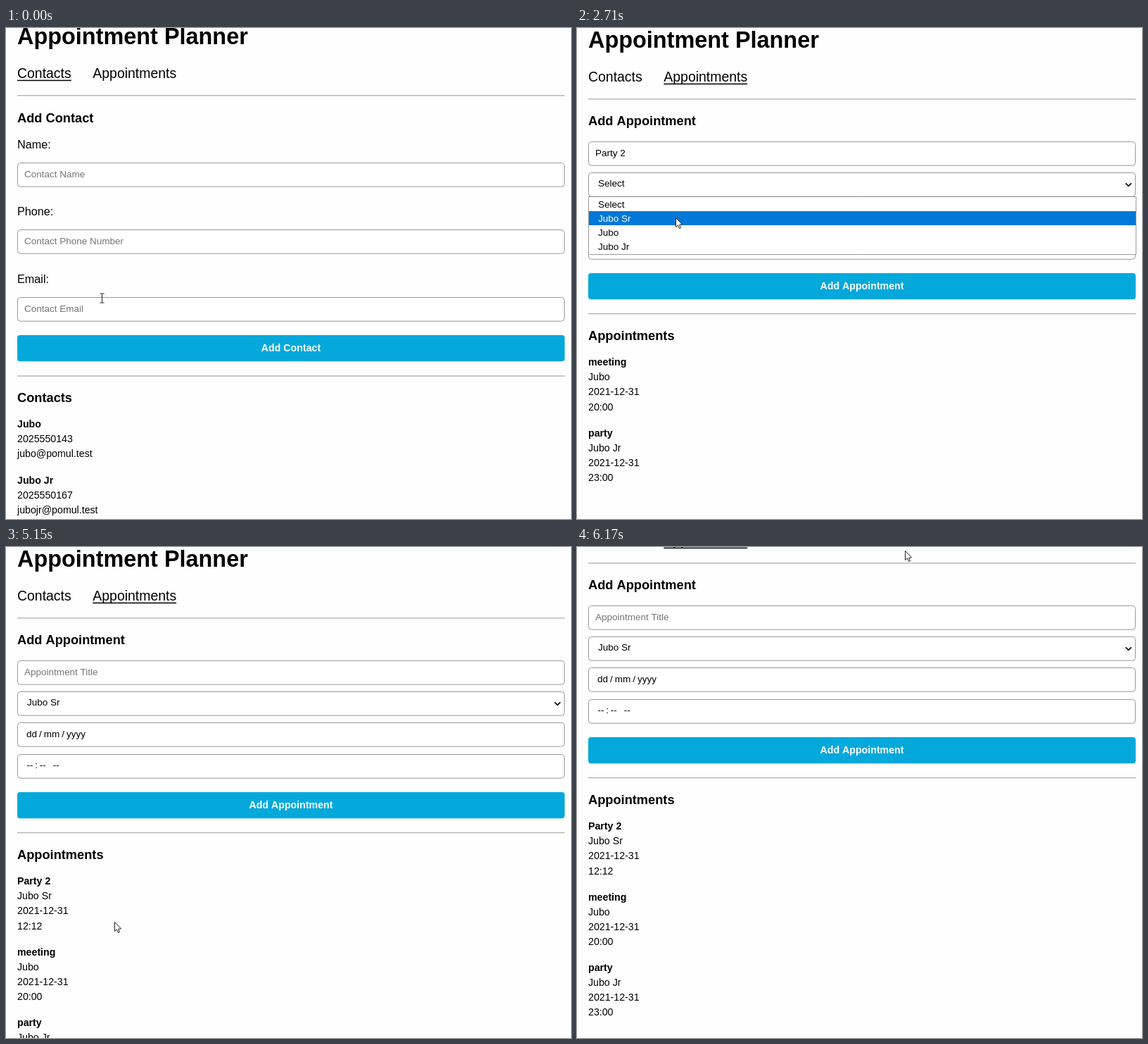
Recreate the animation shown at these times as an HTML page with a canvas. Size 803 by 697 pixels, loop 6200 ms.

```html
<!DOCTYPE html>
<html lang="en">
<head>
<meta charset="utf-8">
<title>Appointment Planner</title>
<style>
html, body { margin: 0; width: 803px; height: 697px; overflow: hidden; background: #fff; }
canvas { display: block; }
</style>
</head>
<body>
<canvas id="stage" width="803" height="697"></canvas>
<script>
const ctx = document.getElementById('stage').getContext('2d');
const LOOP = 6200, STEP = 46.7, GLIDE = 180;
const SANS = '"Liberation Sans", Arial, sans-serif';
const UI = '"Open Sans", "Noto Sans", sans-serif';
const BLUE = '#04a8da', PICK = '#0078d7', GREY = '#757575', EDGE = '#999';

const NAME = 'Jubo', JR = NAME + ' Jr', SR = NAME + ' Sr';
const PHONE = '2025550143', MAIL = '@pomul.test';
const people = [
  [SR, PHONE, 'syk' + MAIL],
  [NAME, PHONE, 'jubo' + MAIL],
  [JR, '2025550167', 'jubojr' + MAIL]
];
const DAY = '2021-12-31';
const events = [
  ['Party 2', SR, DAY, '12:12'],
  ['meeting', NAME, DAY, '20:00'],
  ['party', JR, DAY, '23:00']
];

// Moments of each action
const T = {
  name: 210, addContact: 1170, tab: 2005, title: 2300, openList: 2600,
  pickName: 2780, openDate: 2950, month: 3370, monthStep: 110, pickDate: 4000,
  focusTime: 4240, addEvent: 4760, rest: 5100, scroll: 5230
};
const segment = i => T.focusTime + 70 + i * 95;

// Each action happens at a place; the pointer glides there just before
const actions = [
  { at: T.name, x: 150, y: 208 },
  { at: T.addContact, x: 345, y: 460 },
  { at: T.tab, x: 171, y: 64 },
  { at: T.title, x: 150, y: 178 },
  { at: T.openList, x: 150, y: 222 },
  { at: T.pickName, x: 140, y: 270 },
  { at: T.openDate, x: 101, y: 266 },
  { at: T.month, x: 258, y: 312, repeat: 4 },
  { at: T.pickDate, x: 220, y: 477 },
  { at: T.focusTime, x: 36, y: 311 },
  { at: T.addEvent, x: 400, y: 368 },
  { at: T.rest, x: 154, y: 532, repeat: 0 },
  { at: LOOP, x: 466, y: 5, repeat: 0 }
];

const clamp = v => Math.max(0, Math.min(1, v));
const between = (t, a, b) => t >= a && t < b;
const mix = (a, b, u) => a + (b - a) * u;

function pointer(t) {
  let x = 135, y = 397;
  for (const a of actions) {
    const u = clamp((t - a.at + 60 + GLIDE) / GLIDE), e = u * u * (3 - 2 * u);
    x = mix(x, a.x, e);
    y = mix(y, a.y, e);
  }
  return [x, y];
}

function pressed(t) {
  return actions.some(({ at, repeat = 1 }) => {
    for (let i = 0; i < repeat; i++)
      if (between(t - at - i * T.monthStep, -60, 40)) return true;
    return false;
  });
}

function typed(s, t, start, span) {
  return s.slice(0, Math.floor(s.length * clamp((t - start) / span)));
}

function text(s, x, y, size, color = '#000', weight = '', align = 'left', family = SANS) {
  ctx.font = `${weight} ${size}px ${family}`;
  ctx.fillStyle = color;
  ctx.textAlign = align;
  ctx.fillText(s, x, y);
}

function rect(x, y, w, h, color) {
  ctx.fillStyle = color;
  ctx.fillRect(x, y, w, h);
}

function box(x, y, w, h, r, fill, stroke) {
  ctx.beginPath();
  ctx.roundRect(x, y, w, h, r);
  if (fill) { ctx.fillStyle = fill; ctx.fill(); }
  if (stroke) { ctx.strokeStyle = stroke; ctx.lineWidth = 1; ctx.stroke(); }
}

function line(points, color, width) {
  ctx.beginPath();
  points.forEach(p => ctx.lineTo(...p));
  ctx.strokeStyle = color;
  ctx.lineWidth = width;
  ctx.stroke();
}

// Open arrow head of half-size r; turn 0 points down
function chevron(x, y, r, turn, color, width) {
  ctx.save();
  ctx.translate(x, y);
  ctx.rotate(turn * Math.PI / 2);
  line([[-r, -r / 2], [0, r / 2], [r, -r / 2]], color, width);
  ctx.restore();
}

const rule = y => rect(16, y, 778, 1, EDGE);
const heading = (s, y) => text(s, 16, y, 18.24, '#000', 'bold');
const frame = y => box(16.5, y + .5, 777, 33.7, 4, '#fff', EDGE);

function input(y, value, hint, caret) {
  frame(y);
  text(value || hint, 26, y + 20.5, 13.51, value ? '#000' : GREY);
  if (caret) rect(26 + (value ? ctx.measureText(value).width : 0), y + 8, 1, 16, '#000');
}

function button(s, y) {
  box(16, y, 778, 37.2, 4, BLUE);
  text(s, 405, y + 23.4, 14.19, '#fff', 'bold', 'center');
}

function list(items, y, pitch) {
  items.forEach((rows, i) => rows.forEach((s, j) =>
    text(s, 16, y + i * pitch + j * 21.1, 14.19, '#000', j ? '' : 'bold')));
}

// Segmented date or time value: [text, gap after, selected]
function segments(parts, x, y) {
  for (const [s, gap, on] of parts) {
    ctx.font = `13.51px ${SANS}`;
    const w = ctx.measureText(s).width;
    if (on) rect(x - 3, y - 13, w + 6.5, 17, PICK);
    text(s, x, y, 13.51, on ? '#fff' : '#000');
    x += w + gap;
  }
}

function header(active) {
  text('Appointment Planner', 16, 28.4, 32.43, '#000', 'bold');
  ['Contacts', 'Appointments'].forEach((s, i) => {
    const x = i ? 123.3 : 16;
    text(s, x, 76.4, 19.46);
    if (i === active) rect(x, 78.7, ctx.measureText(s).width, 1.5, '#000');
  });
  rule(100.4);
}

function contactsPage(t) {
  ctx.save();
  ctx.translate(0, -5);
  header(0);
  ctx.restore();
  heading('Add Contact', 133.5);
  const done = t >= T.addContact;
  ['Name', 'Phone Number', 'Email'].forEach((s, i) => {
    const start = T.name + 40 + i * 250, y = i * 95.3;
    text(s.split(' ')[0] + ':', 16, 171 + y, 16.22);
    const value = done ? '' : typed(people[0][i], t, start, 190);
    input(Math.round(191 + y), value, 'Contact ' + s, between(t, start - 50, start + 190));
  });
  button('Add Contact', 436);
  rule(493.5);
  heading('Contacts', 530.8);
  list(done ? people : people.slice(1), 567.2, 79.5);
}

function appointmentsPage(t) {
  const done = t >= T.addEvent;
  const row = i => Math.round(161.2 + i * 44.1);
  header(1);
  heading('Add Appointment', 138.4);
  const title = done ? '' : typed('Party 2', t, T.title + 20, 200);
  input(row(0), title, 'Appointment Title', between(t, T.title, T.title + 230));

  frame(row(1));
  text(t >= T.pickName ? SR : 'Select', 30, 225.3, 13.51);
  chevron(783.8, 222.3, 4, 0, '#000', 1.7);

  frame(row(2));
  const dated = between(t, T.pickDate, T.addEvent);
  segments([
    [dated ? '31' : 'dd', 3], ['/', 3], [dated ? '12' : 'mm', 3], ['/', 3],
    [dated ? '2021' : 'yyyy', 0, between(t, T.openDate, T.focusTime)]
  ], 29, 270);

  frame(row(3));
  const part = (i, s) => between(t, segment(i), T.addEvent) ? s : '--';
  const focus = i => between(t, i ? segment(i - 1) : T.focusTime, i < 2 ? segment(i) : T.addEvent - 60);
  segments([
    [part(0, '12'), 2.8, focus(0)], [':', 2.7],
    [part(1, '12'), 10, focus(1)], [part(2, 'PM'), 0, focus(2)]
  ], 29.5, 314);

  button('Add Appointment', 348);
  rule(405.2);
  heading('Appointments', 443.3);
  list(done ? events : events.slice(1), 479.2, 100.4);

  if (between(t, T.openList, T.pickName)) nameMenu(pointer(t)[1]);
  if (between(t, T.openDate, T.pickDate)) calendar(t);
}

function nameMenu(py) {
  box(16.5, 239.5, 778, 82, 0, '#fff', EDGE);
  ['Select', ...people.map(p => p[0])].forEach((s, i) => {
    const y = 240 + i * 20;
    const on = py < 240 ? i === 0 : between(py, y, y + 20);
    if (on) rect(17, y, 777, 20, PICK);
    text(s, 30, y + 15, 13.51, on ? '#fff' : '#000');
  });
}

function calendar(t) {
  const step = t < T.month ? 0 : Math.min(4, 1 + Math.floor((t - T.month) / T.monthStep));
  const first = new Date(2021, 7 + step, 1);
  const months = ['August', 'September', 'October', 'November', 'December'];
  const col = i => 53 + i * 33.43;

  box(19.5, 287.5, 268, 243, 8, '#fff', '#aaa');
  chevron(52, 317, 6, 1, '#666', 1.4);
  chevron(255, 317, 6, -1, '#666', 1.4);
  box(97.5, 306.5, 112, 21, 3, '#fff', '#555');
  text(months[step] + ' 2021', 146, 321.6, 12.8, '#000', '', 'center', UI);
  chevron(196, 316.8, 5.5, 0, '#666', 1.2);

  'Sun Mon Tue Wed Thu Fri Sat'.split(' ').forEach((s, i) =>
    text(s, col(i), 354.2, 11, i ? '#888' : '#f47c7c', '', 'center', UI));

  const lead = first.getDay() || 7;
  for (let i = 0; i < 42; i++) {
    const d = new Date(2021, 7 + step, 1 - lead + i);
    const own = d.getMonth() === first.getMonth();
    const today = d.getMonth() === 7 && d.getDate() === 19;
    const x = col(i % 7), y = 375.3 + Math.floor(i / 7) * 25.3;
    if (today) box(x - 15, y - 11.5, 30, 22.5, 3, '#a8a8a8');
    const color = i % 7 ? (own ? '#111' : '#999') : (own ? '#e8202a' : '#f47c7c');
    text(d.getDate(), x, y + 4.2, 11.2, color, today ? 'bold' : '', 'center', UI);
  }
}

function beam(x, y) {
  line([[x, y - 6], [x, y + 6]], '#222', 1);
  for (const end of [-6.5, 6.5]) line([[x - 3, y + end], [x + 3, y + end]], '#222', 1);
}

function hand(x, y) {
  for (const stroke of ['#222', null]) {
    box(x - 4, y + 6, 10, 10, 3, '#fff', stroke);
    box(x - 2, y - 1, 2.5, 12, 1.2, '#fff', stroke);
  }
  line([[x + 2.5, y + 6], [x + 2.5, y + 10]], '#222', .8);
}

function arrow(x, y) {
  ctx.save();
  ctx.translate(x, y);
  ctx.beginPath();
  [[0, 0], [0, 13], [3, 10.4], [5, 15], [7, 14.2], [5.2, 9.8], [9, 9.4]].forEach(p => ctx.lineTo(...p));
  ctx.closePath();
  ctx.fillStyle = '#fff';
  ctx.fill();
  ctx.strokeStyle = '#222';
  ctx.lineWidth = 1;
  ctx.stroke();
  ctx.restore();
}

function drawPointer(t) {
  const [px, py] = pointer(t);
  const onField = t < T.tab
    ? [191, 286, 382].some(y => between(py, y, y + 34))
    : t < T.addEvent && between(py, 161, 195);
  const onLink = t < T.title && between(py, 55, 80);
  const look = onField ? beam : onLink ? hand : arrow;
  look(Math.round(px) + .5, Math.round(py) + .5);
  if (pressed(t)) {
    ctx.beginPath();
    ctx.arc(px, py, 12, 0, 7);
    ctx.fillStyle = 'rgba(255,248,0,.5)';
    ctx.fill();
  }
}

function draw(t) {
  rect(0, 0, 803, 697, '#fefefe');
  ctx.save();
  if (t < T.tab) {
    contactsPage(t);
  } else {
    const u = clamp((t - T.scroll) / 850);
    ctx.translate(0, -Math.round(78 * (1 - Math.pow(1 - u, 1.7))));
    appointmentsPage(t);
  }
  ctx.restore();
  drawPointer(t);
}

const start = performance.now();
function tick() {
  const t = (performance.now() - start) % LOOP;
  draw(Math.floor((t + 3) / STEP) * STEP);
  requestAnimationFrame(tick);
}
tick();
</script>
</body>
</html>
```
